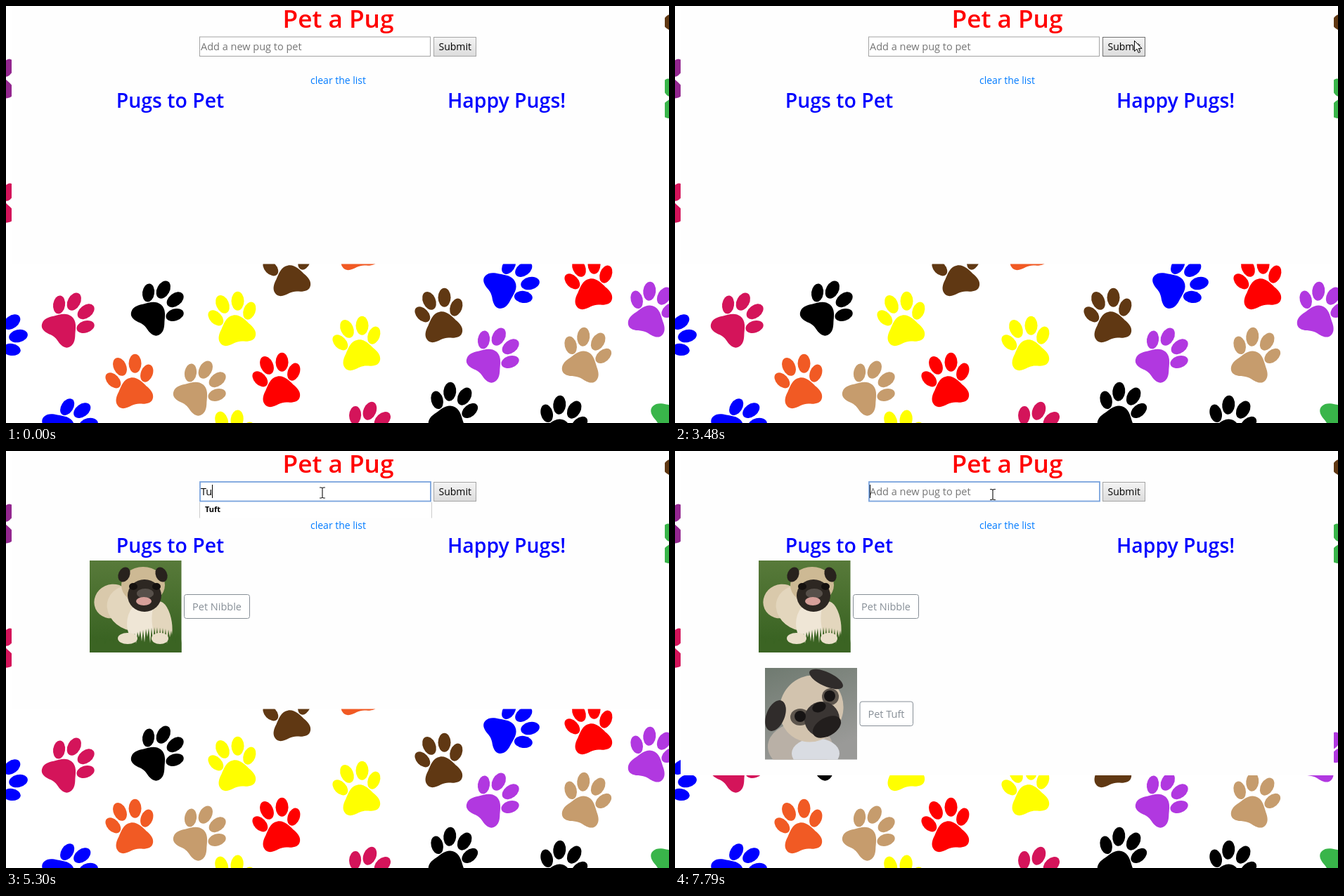
An HTML page for the animation above (8000 ms loop, 943 by 594 pixels).

```html
<!DOCTYPE html>
<html lang="en">
<head>
<meta charset="utf-8">
<title>Pet a Pug</title>
<style>
html, body { margin: 0; width: 100%; height: 100%; overflow: hidden; background: #fff; }
svg { display: block; }
text { font: 14.5px "Open Sans", "Noto Sans", sans-serif; white-space: pre; }
.mid { text-anchor: middle; }
.title { font-size: 35.2px; font-weight: 600; fill: #f00; }
.heading { font-size: 28.4px; font-weight: 600; fill: #00f; }
.link { font-size: 14px; fill: #007bff; }
.submit { font-size: 14px; }
.hint { font-size: 11px; font-weight: 700; }
.pet > rect { fill: #fff; stroke: #868e96; }
.pet > text { fill: #868e96; }
</style>
</head>
<body>
<svg width="943" height="594" viewBox="0 0 943 594">
  <defs>
    <linearGradient id="face" x2="0" y2="1"><stop stop-color="#f4f4f4"/><stop offset="1" stop-color="#dcdcdc"/></linearGradient>
    <linearGradient id="lawn" x2="0" y2="1"><stop stop-color="#587a3a"/><stop offset="1" stop-color="#35601f"/></linearGradient>
    <linearGradient id="gravel" x2="0.4" y2="1"><stop stop-color="#6f7a70"/><stop offset="1" stop-color="#9a9a98"/></linearGradient>
    <g id="paw">
      <path d="M0-22C10-22 15-13 20-6C25 0 28 6 26 12C23 21 13 19 6 17C2 16-2 16-6 17C-13 19-23 21-26 12C-28 6-25 0-20-6C-15-13-10-22 0-22Z"/>
      <ellipse rx="8.5" ry="13" transform="translate(-24.5 -23.5) rotate(-32)"/>
      <ellipse rx="9" ry="13.5" transform="translate(-11 -40.5) rotate(-12)"/>
      <ellipse rx="9" ry="13.5" transform="translate(11 -40.5) rotate(12)"/>
      <ellipse rx="8.5" ry="13" transform="translate(24.5 -23.5) rotate(32)"/>
    </g>
  </defs>
  <g id="paws" transform="translate(1.2 -0.8)"></g>
  <rect id="panel" x="8" width="929" height="367" fill="#fefefe"/>

  <text class="title mid" x="472.5" y="31">Pet a Pug</text>
  <text class="link mid" x="472.5" y="111">clear the list</text>
  <text class="heading mid" x="233.5" y="145">Pugs to Pet</text>
  <text class="heading mid" x="712" y="145">Happy Pugs!</text>

  <g class="pet" id="pet1">
    <svg id="photo1" x="119" y="156" width="130.5" height="131"></svg>
    <rect x="253.5" y="204.5" width="93" height="34" rx="3"/>
    <text class="mid" x="300" y="227">Pet Nibble</text>
  </g>
  <g class="pet" id="pet2">
    <svg id="photo2" x="128" y="309" width="131" height="130.5"></svg>
    <rect x="263" y="357" width="75.5" height="34.5" rx="3"/>
    <text class="mid" x="300.5" y="380">Pet Tuft</text>
  </g>

  <rect id="field" fill="#fff"/>
  <text id="entry" x="277" y="63"></text>
  <path id="caret" stroke="#000"/>
  <rect id="button" x="608.5" y="44.5" width="60" height="27" fill="url(#face)"/>
  <text class="submit mid" x="638.7" y="63">Submit</text>

  <g id="menu">
    <rect id="menuFill" x="275" y="73" width="331" fill="#fff"/>
    <path id="menuEdge" fill="none" stroke="#ccc"/>
    <text class="hint" x="283" y="87"></text>
    <text class="hint" x="283" y="109.5"></text>
    <text class="hint" x="283" y="132"></text>
  </g>

  <path id="arrow" fill="#fff" stroke="#000" stroke-linejoin="round" d="M.5.5V15.5L4 12.2L6.3 17.5L8.6 16.5L6.4 11.4H11Z"/>
  <path id="beam" fill="none" stroke="#222" stroke-width="1.2" d="M-4-7.5H-1.5L0-6.5L1.5-7.5H4M0-6.5V6.5M-4 7.5H-1.5L0 6.5L1.5 7.5H4"/>
</svg>
<script>
const LOOP = 8000;
const $ = id => document.getElementById(id);
const set = (el, attrs) => { for (const key in attrs) el.setAttribute(key, attrs[key]); };
const show = (el, on) => el.style.display = on ? "" : "none";
const between = (t, spans) => spans.some(([from, to]) => t >= from && t < to);

// Paws grouped by colour: x, y, rotation
const paws = {
  "#d4145a": [[78, 460, 40], [502, 617, 35], [-17, 294, -12]],
  "#000": [[205, 443, 40], [628, 592, 18], [784, 611, 18]],
  "#ff0": [[326, 463, -12], [503, 498, -12], [320, 631, -5]],
  "#603813": [[404, 392, -12], [620, 458, -12], [962, 28, 40]],
  "#f15a24": [[500, 355, -12], [180, 552, -12]],
  "#00f": [[703, 403, 65], [-25, 478, 65], [75, 604, 65]],
  "#f00": [[833, 411, -12], [389, 550, -12]],
  "#b138e0": [[912, 449, 18], [682, 510, 40]],
  "#c69c6d": [[818, 514, 18], [265, 557, 40]],
  "#39b54a": [[941, 589, 65], [958, 147, 18]],
  "#93278f": [[-18, 117, -12]]
};
$("paws").innerHTML = Object.entries(paws).map(([color, list]) =>
  `<g fill="${color}">` + list.map(([x, y, turn]) =>
    `<use href="#paw" transform="translate(${x} ${y}) rotate(${turn})"/>`).join("") + "</g>").join("");

// Simplified photos
const oval = (fill, x, y, rx, ry, turn = 0) =>
  `<ellipse fill="${fill}" rx="${rx}" ry="${ry}" transform="translate(${x} ${y}) rotate(${turn})"/>`;
const backdrop = fill => `<rect width="131" height="131" fill="url(#${fill})"/>`;
let blades = "M0 131";
for (let x = 0; x <= 132; x += 4) blades += `L${x} ${104 + 9 * Math.sin(x / 20)}L${x + 2} ${114 + 5 * Math.sin(x)}`;
$("photo1").innerHTML = backdrop("lawn") +
  oval("#d9c9ab", 32, 58, 26, 24, -25) + oval("#e3d6bd", 62, 68, 38, 32, 20) +
  oval("#efe6d6", 82, 90, 29, 34) + oval("#e3d6bd", 103, 90, 14, 32, -8) +
  `<path fill="#3b6423" d="${blades}V131Z"/>` +
  oval("#eadfca", 54, 111, 14, 8) + oval("#eadfca", 100, 111, 12, 8) +
  oval("#cdb994", 76, 35, 31, 26) + oval("#28221d", 49, 20, 8, 11, 25) + oval("#28221d", 102, 20, 8, 11, -25) +
  oval("#2d2722", 78, 50, 24, 23) + oval("#15110f", 62, 37, 6, 5) + oval("#15110f", 95, 37, 6, 5) +
  oval("#57504a", 79, 47, 12, 7) + oval("#d7a09a", 77, 58, 11, 6);
$("photo2").innerHTML = backdrop("gravel") +
  oval("#b9b0a6", 50, 112, 46, 34) + oval("#d9dce2", 72, 122, 34, 22) +
  oval("#d2c3ae", 66, 58, 45, 48, 25) + oval("#302c2b", 15, 68, 13, 23, 22) +
  oval("#302c2b", 87, 16, 26, 10, 25) + oval("#5d554d", 50, 70, 14, 12) + oval("#5d554d", 93, 41, 12, 12) +
  oval("#3a3533", 81, 73, 25, 25, 30) + oval("#171414", 50, 69, 8, 8) + oval("#171414", 92, 40, 8, 8) +
  oval("#171414", 77, 56, 10, 7, -20) + oval("#221e1d", 88, 84, 22, 13, -30);

// Pointer moves: start, last step, number of steps, end point
const moves = [
  [70, 630, 8, 343, 55],
  [2870, 3250, 6, 648, 66],
  [3400, 3480, 2, 653, 49],
  [3630, 3630, 1, 656, 49],
  [3800, 4180, 6, 453, 57],
  [4730, 4730, 1, 450, 59.5],
  [6150, 6530, 6, 627, 59.5],
  [6680, 7080, 6, 456, 61],
  [7790, 7790, 1, 452, 62]
];
function pointerAt(t) {
  let x = 780, y = 452;
  for (const [start, end, steps, toX, toY] of moves) {
    if (t < start) break;
    const gap = (end - start) / (steps - 1) || 1;
    const p = Math.min(1, (Math.floor((t - start) / gap + 0.1) + 1) / steps);
    const eased = 0.3 * p + 0.7 * p * p * (3 - 2 * p);
    x += (toX - x) * eased;
    y += (toY - y) * eased;
  }
  return [x, y];
}

// Typing: word, key times, time the field is cleared
const typing = [
  ["Nibble", [1770, 1920, 2090, 2240, 2320, 2400], 3480],
  ["Tuft", [5220, 5300, 5370, 5600], 6760]
];
function typedAt(t) {
  for (const [word, keys, cleared] of typing)
    if (t < cleared) return word.slice(0, keys.filter(k => t >= k).length);
  return "";
}

const focusSpans = [[1090, 3400], [4500, 6680], [7540, LOOP]];
const caretSpans = [[1090, 1620], [1770, 2950], [4500, 5050], [5220, 6150], [7540, LOOP]];
const suggestions = ["Nibble", "Nougat", "Nuzzle", "Tuft", "Toffee"];

function draw(t) {
  const focused = between(t, focusSpans);
  const typed = typedAt(t);
  set($("field"), focused
    ? { x: 276, y: 44, width: 328, height: 27.5, stroke: "#79a3dd", "stroke-width": 1.8 }
    : { x: 275.5, y: 44, width: 328, height: 27.5, stroke: "#a3a3a3", "stroke-width": 1 });
  const entry = $("entry");
  entry.textContent = typed || "Add a new pug to pet";
  set(entry, { fill: typed ? "#000" : "#757575" });
  const caretX = Math.round(277 + (typed ? entry.getComputedTextLength() : 0)) + 0.5;
  set($("caret"), { d: `M${caretX} 48V67` });
  show($("caret"), between(t, caretSpans));

  const matches = typed && focused ? suggestions.filter(s => s.startsWith(typed)) : [];
  const bottom = 73 + 22.5 * matches.length;
  const shrinking = between(t, [[5300, 5370]]);
  show($("menu"), matches.length);
  set($("menuFill"), { height: bottom - 73 });
  set($("menuEdge"), { d: `M275.5 73V${bottom}${shrinking ? "M" : "L"}605.5 ${bottom}V73` });
  document.querySelectorAll(".hint").forEach((row, i) => row.textContent = matches[i] || "");

  show($("pet1"), t >= 3800);
  show($("pet2"), t >= 6840);
  set($("panel"), { height: t >= 6840 ? 462 : 367.5 });

  const [x, y] = pointerAt(t);
  const inRow = y > 43 && y < 73;
  const inField = inRow && x > 275 && x < 605;
  const onButton = inRow && x > 607 && x < 669;
  set($("button"), { stroke: onButton ? "#707070" : "#a5a5a5" });
  show($("beam"), t >= 70 && inField);
  show($("arrow"), t >= 70 && !inField);
  const place = { transform: `translate(${x} ${y})` };
  set($("beam"), place);
  set($("arrow"), place);
}

function tick() {
  draw(performance.now() % LOOP);
  requestAnimationFrame(tick);
}
tick();
</script>
</body>
</html>
```
